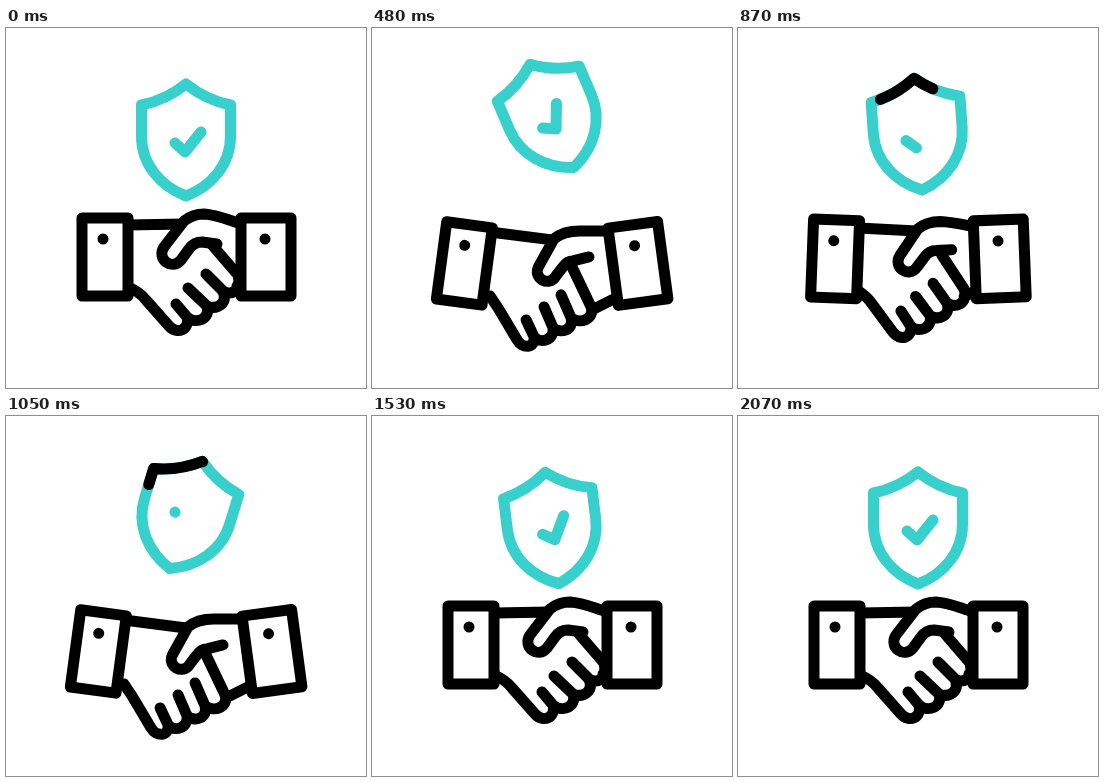
An HTML page for the animation above (2.1 s loop, 360x360 px).

```html
<!DOCTYPE html>
<html lang="en">
<head>
<meta charset="utf-8">
<title>Trusted handshake</title>
<style>
  html, body { margin: 0; width: 100%; height: 100%; overflow: hidden; background: #fff; }
  svg { display: block; width: 100vw; height: 100vh; }
  path, rect { stroke-width: 11; stroke-linecap: round; stroke-linejoin: round; }
</style>
</head>
<body>
<svg viewBox="0 0 360 360" fill="none" stroke="#000">
  <g id="shield">
    <path stroke="#38d0cc" d="M180 56Q200 72 224.500 77V108C224.500 136 206 158 180 168C154 158 135.500 136 135.500 108V77Q160 72 180 56Z"/>
    <path id="streak" d="M224.500 77Q200 72 180 56Q160 72 135.500 77V108C135.500 136 154 158 180 168"/>
  </g>
  <path id="check" stroke="#38d0cc" d="M169 115L179 124L195 104"/>
  <path id="wrist"/>
  <path id="thumb" fill="#fff"/>
  <path id="fingers"/>
  <g id="leftCuff">
    <rect x="76" y="190" width="46" height="78" fill="#fff"/>
    <circle cx="97" cy="211" r="5.500" fill="#000" stroke="none"/>
  </g>
  <g id="rightCuff">
    <rect x="235" y="190" width="50" height="78" fill="#fff"/>
    <circle cx="259" cy="211" r="5.500" fill="#000" stroke="none"/>
  </g>
</svg>
<script>
const LOOP = 2100;
const el = id => document.getElementById(id);

// Smooth curve through [time, value] keys, flat at every extreme.
function track(...keys) {
  const slope = i => (keys[i + 1][1] - keys[i][1]) / (keys[i + 1][0] - keys[i][0]);
  const tangent = i => {
    if (i === 0 || i === keys.length - 1) return 0;
    const a = slope(i - 1), b = slope(i);
    return a * b > 0 ? 2 * a * b / (a + b) : 0;
  };
  return t => {
    if (t <= keys[0][0]) return keys[0][1];
    const i = keys.findIndex(k => k[0] > t) - 1;
    if (i < 0) return keys[keys.length - 1][1];
    const [t0, v0] = keys[i], [t1, v1] = keys[i + 1];
    const d = t1 - t0, u = (t - t0) / d, w = 1 - u;
    return v0 * w * w * (1 + 2 * u) + v1 * u * u * (3 - 2 * u)
      + d * u * w * (w * tangent(i) - u * tangent(i + 1));
  };
}

const shake = track([60, 0], [465, 1], [765, 0], [1065, 1], [1370, 0]);
const lift = track([0, 0], [270, -17], [420, -25], [540, -22], [660, -8],
  [760, -4], [1050, -13], [1130, -20], [1290, 1.5], [1420, 0]);
const tilt = track([0, 0], [270, -6], [650, -33], [1050, 17], [1290, -4],
  [1420, -9], [1530, -7], [1800, 0]);
const checkTilt = track([0, 0], [270, -10], [660, -55], [1050, 30], [1290, 1],
  [1500, -19], [1800, 0]);
const checkSlip = track([300, 0], [660, 1], [1000, 0]);
const checkLength = track([660, 1], [1000, 0], [1060, 0], [1270, 1]);
const streakTail = track([600, 0], [660, 9], [1050, 49], [1220, 130]);
const streakHead = track([600, 0], [660, 39], [1050, 116], [1220, 130]);

// Each part blends between the resting and the lowered pose.
const poses = {
  wrist: ["M122 197L178 196", "M118 204L180 212"],
  thumb: [
    "M236 196C222 192 212 187 198 186Q187 186 178 193L158 219C150 231 166 243 175 232L183 221Q188 214 196 214L211 216",
    "M242 203C230 203 218 203 208 203Q191 203 182 211L167 238C160 250 177 260 184 248L191 239Q195 233 201 233L217 229"
  ],
  fingers: [
    "M122 259Q134 264 140 272L163 298C171 307 184 302 181 289L170 276" +
    "M181 289C190 297 205 291 201 278L182 260M201 278C211 282 222 276 217 263L200 246" +
    "M217 263C224 268 236 264 232 247L207 218M231 258L240 254",
    "M118 268Q122 274 126 280L145 312C150 321 163 321 162 309L154 292" +
    "M162 309C168 316 182 313 181 300L172 279M181 300C188 306 202 303 199 290L189 267" +
    "M199 290C208 297 223 291 219 279L199 237M220 282L242 271"
  ]
};

function blend([from, to], amount) {
  const ends = to.match(/\d+/g);
  let i = 0;
  return from.replace(/\d+/g, n => (+n + (ends[i++] - n) * amount).toFixed(2));
}

function place(id, dx, dy, angle, cx, cy) {
  el(id).setAttribute("transform", `translate(${dx} ${dy}) rotate(${angle} ${cx} ${cy})`);
}

const checkSize = el("check").getTotalLength();

function draw(t) {
  const s = shake(t), hand = Math.pow(Math.max(s, 0), 0.65);
  for (const id in poses) el(id).setAttribute("d", blend(poses[id], hand));
  place("leftCuff", -6.7 * s, 6.5 * s, 7.7 * s, 99, 229);
  place("rightCuff", 6 * s, 6.5 * s, -7.7 * s, 260, 229);

  const y = lift(t), slip = checkSlip(t);
  place("shield", 0, y, tilt(t), 180, 112);
  place("check", -5 * slip, y + 6 * slip, checkTilt(t), 180, 112);
  el("check").setAttribute("stroke-dasharray", `${Math.max(0.1, checkLength(t) * (checkSize + 1))} 200`);

  const tail = streakTail(t), size = streakHead(t) - tail;
  el("streak").setAttribute("visibility", size > 0.5 ? "visible" : "hidden");
  el("streak").setAttribute("stroke-dasharray", `0 ${tail} ${Math.max(size, 0.1)} 400`);
  // A zero-length first dash would leave a round cap at the path start.
  el("streak").setAttribute("stroke-dashoffset", -tail);
  el("streak").setAttribute("stroke-dasharray", `${Math.max(size, 0.1)} 500`);
}

const start = performance.now();
function tick() {
  draw((performance.now() - start) % LOOP);
  requestAnimationFrame(tick);
}
tick();
</script>
</body>
</html>
```
